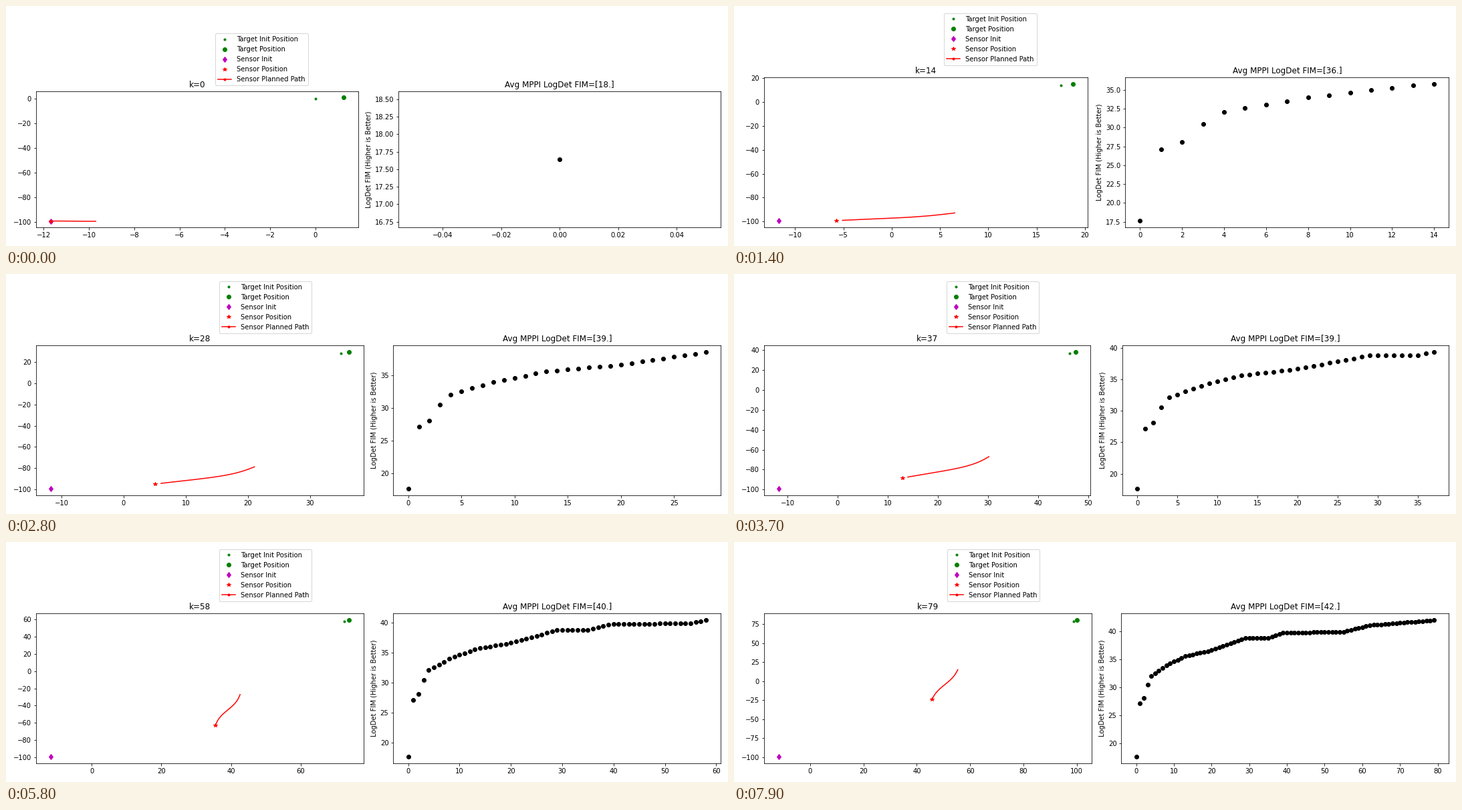
A matplotlib script for the animation above (8000 ms loop, 1080 by 360 pixels).

```python
import numpy as np
import matplotlib.pyplot as plt
from matplotlib.animation import FuncAnimation

STEPS = 80
INTERVAL = 100
HEIGHT = 360

# Sensor way points, each with the length and heading of its planned path.
KEYS = np.array([0, 8, 20, 37, 49, 67, 79])
SENSOR_X = [-11.69, -9.72, -0.82, 12.95, 27.9, 40.85, 45.7]
SENSOR_Y = [-99.15, -99.5, -98.3, -88.4, -75.9, -47.3, -23.9]
REACH = [2.0, 9.2, 18.0, 27.5, 33.7, 38.1, 40.1]
HEADING = [-6, 13.6, 39.4, 51.2, 76, 76, 76]
STATES = np.column_stack([SENSOR_X, SENSOR_Y, REACH, HEADING])
SLOPES = np.gradient(STATES, KEYS, axis=0)
SLOPES[0] = 0

# LogDet jumps up at first, then climbs in gentle stages.
FIM_STEPS = [0, 1, 2, 3, 4, 8, 13, 20, 29, 35, 39, 55, 62, 79]
FIM_VALUES = [17.64, 27.15, 28.1, 30.5, 32.1, 33.99, 35.6,
              36.65, 38.8, 38.85, 39.75, 39.95, 41.1, 42.0]
steps = np.arange(STEPS)
fim = np.interp(steps, FIM_STEPS, FIM_VALUES)


def state(k):
    """Smooth (x, y, reach, heading) at step k."""
    i = min(np.searchsorted(KEYS, k, side="right") - 1, len(KEYS) - 2)
    span = KEYS[i + 1] - KEYS[i]
    t = (k - KEYS[i]) / span
    return ((1 + 2 * t) * (1 - t) ** 2 * STATES[i]
            + t * (1 - t) ** 2 * span * SLOPES[i]
            + t * t * (3 - 2 * t) * STATES[i + 1]
            + t * t * (t - 1) * span * SLOPES[i + 1])


def planned_path(k, x, y, reach, heading):
    """A chord along the heading, bowed to its right with a slight S."""
    s = np.linspace(0.05, 1, 40)
    bow = max(0, 0.095 * np.sin(np.pi * k / 58))
    side = bow * np.sin(np.pi * s) - 0.015 * np.sin(2 * np.pi * s)
    c, d = np.cos(np.radians(heading)), np.sin(np.radians(heading))
    return x + reach * (s * c + side * d), y + reach * (s * d - side * c)


fig, (scene, chart) = plt.subplots(1, 2, figsize=(15, 5), dpi=72)

target_init, = scene.plot([], [], "g.", label="Target Init Position")
target, = scene.plot([], [], "go", label="Target Position")
scene.plot(SENSOR_X[0], SENSOR_Y[0], "md", label="Sensor Init")
sensor, = scene.plot([], [], "r*", label="Sensor Position")
scene.plot([], [], "r.-", label="Sensor Planned Path")
path, = scene.plot([], [], "r-")
scene.legend(loc="upper center", bbox_to_anchor=(0.7, 1.45))

dots, = chart.plot([], [], "ko")
chart.set_ylabel("LogDet FIM (Higher is Better)")


def settle_layout(k):
    """The axes height swings around its resting value, then settles."""
    height = 225.2 + 46.6 * (-0.45) ** k
    bottom = 0.0775
    fig.subplots_adjust(left=0.042, right=0.99, wspace=0.1,
                        bottom=bottom, top=bottom + height / HEIGHT)
    fig.tight_layout()


def update(k):
    x, y, reach, heading = state(k)
    target_init.set_data([1.25 * k], [k])
    target.set_data([1.25 * (k + 1)], [k + 1])
    sensor.set_data([x], [y])
    path.set_data(*planned_path(k, x, y, reach, heading))
    dots.set_data(steps[:k + 1], fim[:k + 1])
    scene.set_title(f"k={k}")
    chart.set_title(f"Avg MPPI LogDet FIM=[{fim[k]:.0f}.]")
    for ax in (scene, chart):
        ax.relim()
        ax.autoscale_view()
    settle_layout(k)
    return []


anim = FuncAnimation(fig, update, frames=STEPS, init_func=lambda: [],
                     interval=INTERVAL, repeat=True, repeat_delay=0)
plt.show()
```
